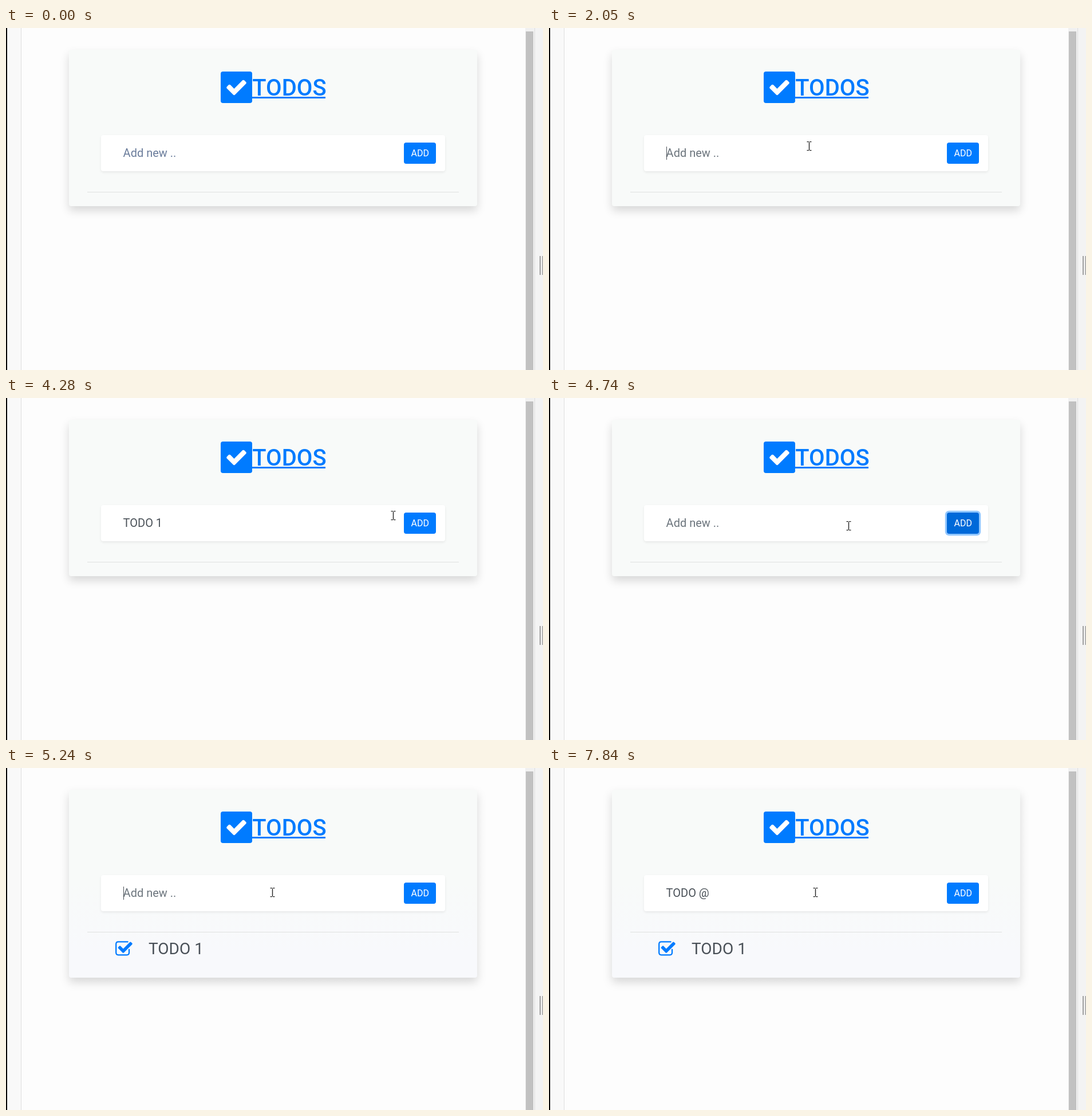
An HTML page with a canvas that plays this animation: 938 by 597 pixels, repeating every 8 s.

```html
<!DOCTYPE html>
<html lang="en">
<head>
<meta charset="utf-8">
<title>Todo list</title>
<style>
  html, body { margin: 0; width: 100%; height: 100%; overflow: hidden; background: #fdfdfd; }
  canvas { display: block; width: 938px; height: 597px; }
</style>
</head>
<body>
<canvas id="stage" width="938" height="597"></canvas>
<script>
const ctx = document.getElementById('stage').getContext('2d');
const LOOP = 8000;
const BLUE = '#007bff';
const INK = '#495057';
const TEXT_X = 204.6;

const CHECK = new Path2D('M1671 566q0 40-28 68l-724 724-136 136q-28 28-68 28t-68-28l-136-136-362-362q-28-28-28-68t28-68l136-136q28-28 68-28t68 28l294 295 656-657q28-28 68-28t68 28l136 136q28 28 28 68z');
const TICK = new Path2D('M1703 441l-814 814q-24 24-57 24t-57-24l-430-430q-24-24-24-57t24-57l110-110q24-24 57-24t57 24l263 263 647-647q24-24 57-24t57 24l110 110q24 24 24 57t-24 57z');
const FRAME = new Path2D('M1270 195Q1230 192 1184 192H352Q128 192 128 416V1248Q128 1472 352 1472H1184Q1408 1472 1408 1248V950');
const ARROW = new Path2D('M.5 .5V16.5L4.2 13L6.8 18.5L9 17.5L6.5 12H11.5Z');
const HAND = new Path2D('M-1.5 1Q0 -1 1.5 1V8L8 9.5Q10 10 10 13L8.5 18V21H-2V18.5L-6.5 13Q-7 10.5 -4.5 11L-1.5 13.5Z');

// Typed text: [time, value]
const TYPED = [
  [0, ''], [2220, 'T'], [2470, 'TO'], [2640, 'TOD'], [2720, 'TODO'], [2950, 'TODO '],
  [3270, 'TODO 1'], [4740, ''], [6050, 'T'], [6220, 'TO'], [6290, 'TOD'],
  [6460, 'TODO'], [6880, 'TODO '], [7280, 'TODO @']
];

// Spans in which the caret shows
const CARET = [[1110, 1590], [2050, 3820], [4360, 4660], [5160, 5720], [6050, 7840]];

// Pointer moves: sampling step and points [time, x, y]
const MOVES = [
  { step: 79, points: [[320, 745, 531], [478, 690, 430], [636, 562, 292], [794, 470, 222], [873, 455, 202], [952, 454, 206]] },
  { step: 76, points: [[3820, 456, 203], [3896, 475, 170], [4048, 560, 128], [4200, 646, 172], [4276, 676, 205], [4428, 712, 215], [4580, 722, 214]] },
  { step: 75, points: [[4660, 722, 214], [4735, 523, 223], [4810, 470, 218], [4885, 465, 217]] }
];

const clamp = v => Math.max(0, Math.min(1, v));
const ramp = (t, from, to) => clamp((t - from) / (to - from));

function box(x, y, w, h, r, color) {
  ctx.fillStyle = color;
  ctx.beginPath();
  ctx.roundRect(x, y, w, h, r);
  ctx.fill();
}

function rect(x, y, w, h, color) {
  ctx.fillStyle = color;
  ctx.fillRect(x, y, w, h);
}

function shadowBox(x, y, w, h, r, color, dy, blur, alpha) {
  ctx.save();
  ctx.shadowColor = `rgba(0,0,0,${alpha})`;
  ctx.shadowOffsetY = dy;
  ctx.shadowBlur = blur;
  box(x, y, w, h, r, color);
  ctx.restore();
}

function label(text, x, y, size, color, weight = 400) {
  ctx.font = `${weight} ${size}px Roboto, sans-serif`;
  ctx.fillStyle = color;
  ctx.fillText(text, x, y);
}

function icon(x, y, size, draw) {
  ctx.save();
  ctx.translate(x, y);
  ctx.scale(size / 1792, size / 1792);
  draw();
  ctx.restore();
}

function drawWindow() {
  rect(0, 0, 938, 597, '#fdfdfd');
  rect(0, 0, 2, 597, '#000');
  rect(2, 0, 24, 597, '#f9f9f9');
  rect(26, 0, 1, 597, '#dedede');
  rect(907, 0, 15, 597, '#f1f1f1');
  rect(908, 6, 13, 597, '#c1c1c1');
  rect(922, 0, 16, 597, '#f3f3f3');
  rect(923, 0, 1, 597, '#dcdcdc');
  rect(932, 398, 2, 33, '#a0a0a0');
  rect(936.5, 398, 1.5, 33, '#a0a0a0');
}

function drawCard(open) {
  const bottom = open ? 366 : 311;
  let color = '#f8faf9';
  if (open) {
    color = ctx.createLinearGradient(0, 200, 0, 320);
    color.addColorStop(0, '#f8faf9');
    color.addColorStop(1, '#f8f9fc');
  }
  shadowBox(110, 38, 713, bottom - 38, 4, color, 8, 16, .15);

  box(375, 76, 55, 55, 4, BLUE);
  icon(382.5, 83.2, 40, () => {
    ctx.fillStyle = '#fff';
    ctx.fill(CHECK);
  });
  label('TODOS', 430.3, 118, 40, BLUE, 500);
  rect(430, 120, 128, 3, BLUE);

  shadowBox(166, 187, 601, 63, 4, '#fff', 2, 4, .075);
  rect(142, 286, 649, 1, '#dfe1e0');

  if (open) {
    icon(189.9, 300, 32, () => {
      ctx.strokeStyle = ctx.fillStyle = BLUE;
      ctx.lineWidth = 128;
      ctx.lineCap = 'round';
      ctx.stroke(FRAME);
      ctx.fill(TICK);
    });
    label('TODO 1', 249, 325, 28, INK);
  }
}

function drawField(t) {
  const text = TYPED.findLast(k => k[0] <= t)[1];
  if (text) label(text, TEXT_X, 225, 20, INK);
  else label('Add new ..', TEXT_X, 225, 20, t < 1040 ? '#6a7c9b' : '#6c757d');

  if (CARET.some(([on, off]) => t >= on && t < off)) {
    const x = Math.floor(TEXT_X + ctx.measureText(text).width);
    rect(text ? x : 205, 207, 1, 23, INK);
  }
}

function drawButton(t) {
  const blur = ramp(t, 4990, 5240);
  const dark = ramp(t, 4428, 4580) * (1 - blur);
  const ring = ramp(t, 4600, 4740) * (1 - blur);
  if (ring) box(691.8, 196.8, 62.4, 43.4, 7, `rgba(38,143,255,${.5 * ring})`);
  box(695, 200, 56, 37, 4, `rgb(0,${123 - 18 * dark},${255 - 38 * dark})`);
  label('ADD', 707.5, 223.7, 16, '#fff');
}

function pointerAt(t) {
  const move = MOVES.findLast(m => m.points[0][0] <= t);
  if (!move) return null;
  const { step, points } = move;
  const start = points[0][0];
  const time = start + Math.floor((t - start) / step) * step;
  const i = points.findLastIndex(p => p[0] <= time);
  const a = points[i], b = points[i + 1] || a;
  const k = a === b ? 0 : ramp(time, a[0], b[0]);
  return [a[1] + (b[1] - a[1]) * k, a[2] + (b[2] - a[2]) * k].map(Math.round);
}

function drawBeam() {
  rect(-.2, -6.5, 1.4, 13.5, '#222');
  for (const y of [-8, 7]) {
    rect(-3.5, y, 3.5, 1.2, '#222');
    rect(1, y, 3.5, 1.2, '#222');
  }
}

function drawPointer(t) {
  const spot = pointerAt(t);
  if (!spot) return;
  const [x, y] = spot;
  const inside = (l, top, r, b) => x >= l && x < r && y >= top && y < b;
  ctx.save();
  ctx.translate(x, y);
  if (inside(166, 187, 767, 250) && !inside(695, 200, 751, 237)) {
    drawBeam();
  } else {
    const shape = inside(695, 200, 751, 237) ? HAND : ARROW;
    ctx.fillStyle = '#fff';
    ctx.strokeStyle = '#000';
    ctx.lineWidth = 1;
    ctx.fill(shape);
    ctx.stroke(shape);
  }
  ctx.restore();
}

function render(t) {
  drawWindow();
  drawCard(t >= 4810);
  drawField(t);
  drawButton(t);
  drawPointer(t);
}

const began = performance.now();
function tick() {
  render((performance.now() - began) % LOOP);
  requestAnimationFrame(tick);
}
tick();
</script>
</body>
</html>
```
